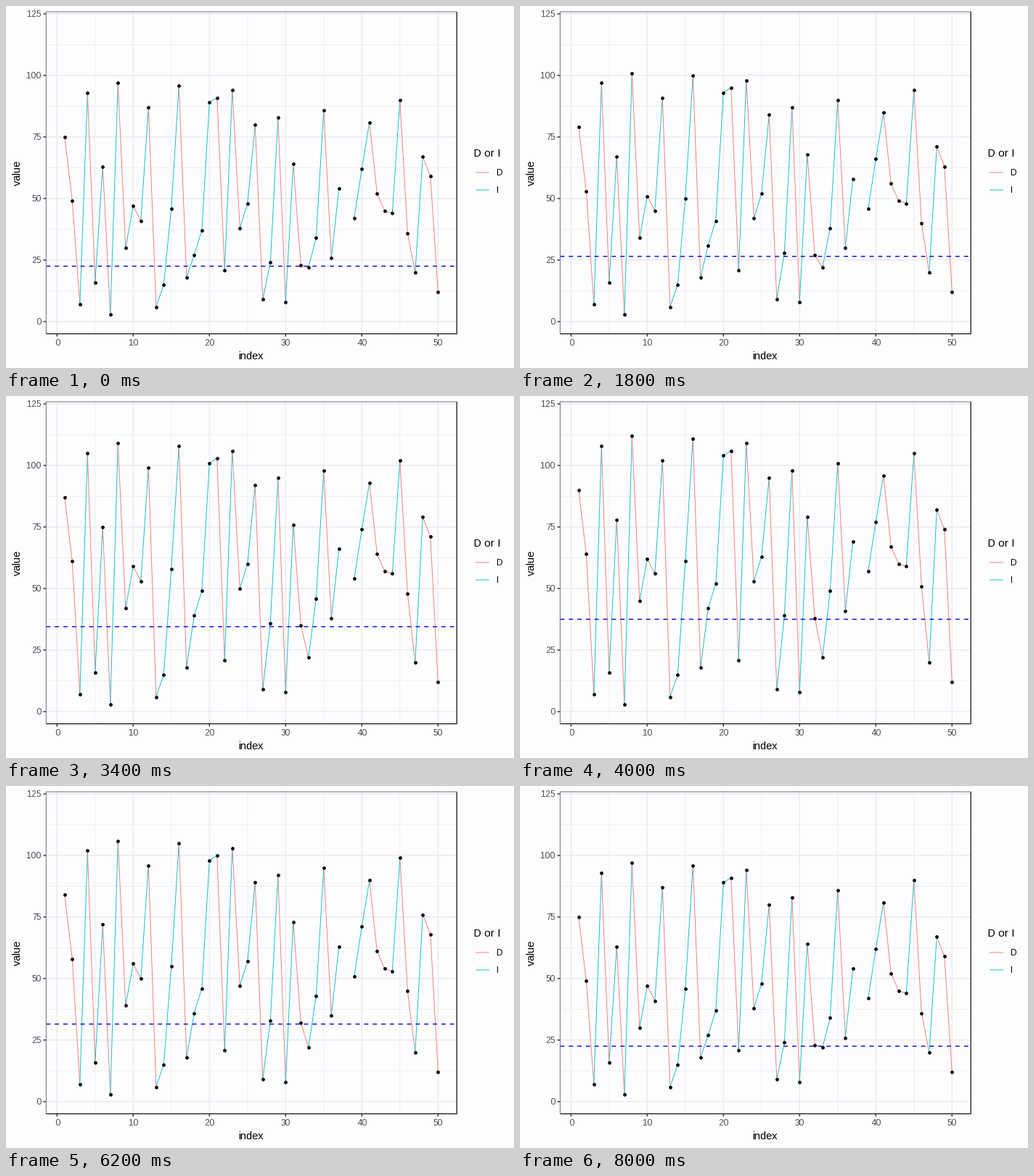
Animation of 700 by 500 pixels, one loop 8.2 s. Source, as a matplotlib script:

```python
import numpy as np
import matplotlib.pyplot as plt
from matplotlib.animation import FuncAnimation
from matplotlib.collections import LineCollection

W, H, DPI = 700, 500, 100
PX = 72 / DPI
FRAMES, INTERVAL = 41, 200
BASE_CUT, MAX_SHIFT = 22.5, 15

LEFT, RIGHT, TOP, BOTTOM = 55.3, 621.2, 8, 452.7
PAPER, INK, TICK_INK = "#fdfdff", "#000000", "#4d4d4d"
GRID, FRAME, FRAME_PALE = "#ebebf0", "#333333", "#6e6e7c"
FALL, RISE = "#f8766d", "#00bfc4"

VALUES = np.array([
    75, 49, 7, 93, 16, 63, 3, 97, 30, 47, 41, 87, 6, 15, 46, 96, 18,
    27, 37, 89, 91, 21, 94, 38, 48, 80, 9, 24, 83, 8, 64, 23, 22, 34,
    86, 26, 54, np.nan, 42, 62, 81, 52, 45, 44, 90, 36, 20, 67, 59, 12])
INDEX = np.arange(1, len(VALUES) + 1)


def px(v):
    return 70.3 + 10.5 * v


def py(v):
    return 435.9 - 3.4 * v


plt.rcParams["font.family"] = "Liberation Sans"
plt.rcParams["text.hinting_factor"] = 1
fig = plt.figure(figsize=(W / DPI, H / DPI), dpi=DPI, facecolor=PAPER)
ax = fig.add_axes([0, 0, 1, 1])
ax.set(xlim=(0, W), ylim=(H, 0))
ax.axis("off")


def line(xs, ys, color, width=1.0, **kw):
    artist, = ax.plot(xs, ys, color=color, lw=width * PX,
                      solid_capstyle="butt", dash_capstyle="butt", **kw)
    artist.set_snap(False)
    return artist


def label(x, y, text, size, color=INK, **kw):
    ax.text(x, y, text, fontsize=size, color=color, va="baseline", **kw)


def grid(xs, ys, width):
    for x in px(xs):
        line([x, x], [TOP, BOTTOM], GRID, width, zorder=1)
    for y in py(ys):
        line([LEFT, RIGHT], [y, y], GRID, width, zorder=1)


# Grid and axes
grid(np.arange(5, 50, 10), np.arange(12.5, 125, 25), 0.74)
grid(np.arange(0, 51, 10), np.arange(0, 126, 25), 1.48)

for v in range(0, 126, 25):
    line([51.5, LEFT], [py(v)] * 2, FRAME, 1.48)
    label(48.5, py(v) + 4.4, str(v), 8.8, TICK_INK, ha="right")
for v in range(0, 51, 10):
    line([px(v)] * 2, [BOTTOM, 456.5], FRAME, 1.48)
    label(px(v), 469.3, str(v), 8.8, TICK_INK, ha="center")

line([LEFT, LEFT, RIGHT], [BOTTOM, TOP, TOP], FRAME_PALE, zorder=6)
line([LEFT, RIGHT, RIGHT], [BOTTOM, BOTTOM, TOP], FRAME, 1.48, zorder=6)

label(338, 488, "index", 11, ha="center")
label(20, 230.3, "value", 11, ha="center", rotation=90,
      rotation_mode="anchor")

# Legend
label(644, 207.6, "D or I", 11)
for name, y, color in (("D", 230, FALL), ("I", 254, RISE)):
    line([647, 666], [y, y], color, 0.9)
    label(675, y + 4.3, name, 8.8)

# Moving parts
keep = ~np.isnan(VALUES[:-1]) & ~np.isnan(VALUES[1:])
falling = VALUES[1:][keep] < VALUES[:-1][keep]
paths = LineCollection([], colors=np.where(falling, FALL, RISE),
                       linewidths=0.9 * PX, zorder=3)
ax.add_collection(paths)
dots, = ax.plot([], [], "o", ms=4.8 * PX, mew=0, color=INK, zorder=4)
dots.set_snap(False)
cut = line([LEFT, RIGHT], [0, 0], "#0c0ce0", 1.48, ls=(0, (4, 4)), zorder=5)


def draw(i):
    shift = min(max(min(i - 5, 40 - i), 0), MAX_SHIFT)
    values = VALUES + np.where(VALUES > BASE_CUT, shift, 0)
    pts = np.column_stack([px(INDEX), py(values)])
    paths.set_segments(np.stack([pts[:-1], pts[1:]], axis=1)[keep])
    dots.set_data(pts[:, 0], pts[:, 1])
    cut.set_ydata([py(BASE_CUT + shift)] * 2)
    return paths, dots, cut


anim = FuncAnimation(fig, draw, frames=FRAMES, interval=INTERVAL,
                     init_func=lambda: draw(0), repeat=True, repeat_delay=0)
plt.show()
```
